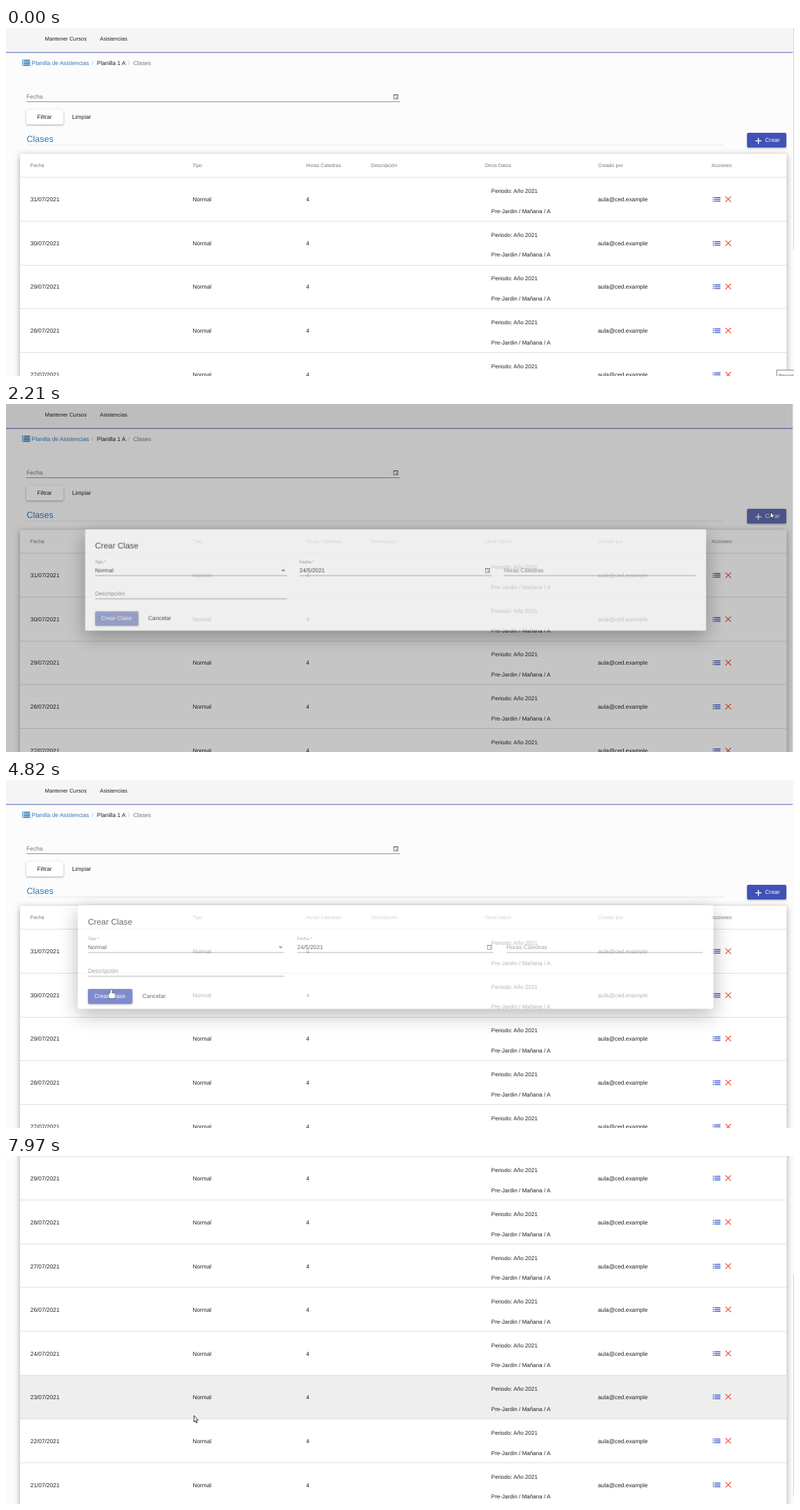
These frames come from a looping animation (1125 by 498 pixels, 8 s). An HTML page with a canvas:

```html
<!DOCTYPE html>
<html lang="es">
<head>
<meta charset="utf-8">
<title>Clases</title>
<style>
html, body { margin: 0; width: 100%; height: 100%; overflow: hidden; background: #fcfcfc; }
canvas { display: block; }
</style>
</head>
<body>
<canvas id="stage" width="1125" height="498"></canvas>
<script>
const W = 1125, H = 498, LOOP = 8000;
const ROW_TOP = 213.3, ROW_H = 62.6, ROWS = 11, SCROLL_END = 338.5;
const INK = 'rgba(0,0,0,.87)', SOFT = 'rgba(0,0,0,.54)', LINE = 'rgba(0,0,0,.42)';
const INDIGO = '#3f51b5', LINK = '#337ab7';
const EMAIL = 'aula@ced.example';

const stage = document.getElementById('stage');
const page = stage.getContext('2d');
const layer = document.createElement('canvas');
layer.width = W;
layer.height = H;
const sheet = layer.getContext('2d');
page.textRendering = sheet.textRendering = 'geometricPrecision';
let c = page;

const clamp = v => Math.max(0, Math.min(1, v));
const span = (t, a, b) => clamp((t - a) / (b - a));
const smooth = u => u * u * (3 - 2 * u);
const easeOut = (u, p) => 1 - Math.pow(1 - u, p);

// Pointer moves: start, end, x, y
const MOVES = [
  [85, 120, 1114, 487],
  [500, 1260, 1062, 178],
  [1300, 1600, 1091, 154],
  [3000, 3190, 588, 250],
  [3430, 3670, 180, 313],
  [3890, 3930, 166, 314],
  [4000, 4250, 150, 300],
  [5580, 5750, 278, 336],
  [7870, 7970, 268, 371]
];

function pointerAt(t) {
  const p = { x: 1114, y: 520 };
  for (const [from, to, x, y] of MOVES) {
    const u = smooth(span(t, from, to));
    p.x += (x - p.x) * u;
    p.y += (y - p.y) * u;
  }
  return p;
}

function text(s, x, y, size = 8.3, color = INK) {
  c.font = size + 'px "Liberation Sans", Arial, sans-serif';
  c.fillStyle = color;
  c.fillText(s, x, Math.round(y));
}

function rect(x, y, w, h, color) {
  c.fillStyle = color;
  c.fillRect(x, y, w, h);
}

function box(x, y, w, h, color, blur, dy, alpha) {
  c.save();
  c.shadowColor = `rgba(0,0,0,${alpha})`;
  c.shadowBlur = blur;
  c.shadowOffsetY = dy;
  c.fillStyle = color;
  c.beginPath();
  c.roundRect(x, y, w, h, 2);
  c.fill();
  c.restore();
}

function button(x, y, w, h, color) {
  box(x, y, w, h, color, 3, 1, 0.34);
}

function line(x0, y0, x1, y1, color, width) {
  c.strokeStyle = color;
  c.lineWidth = width;
  c.beginPath();
  c.moveTo(x0, y0);
  c.lineTo(x1, y1);
  c.stroke();
}

function cross(x, y, r, color, width) {
  line(x - r, y - r, x + r, y + r, color, width);
  line(x + r, y - r, x - r, y + r, color, width);
}

function polygon(points, fill) {
  c.beginPath();
  points.forEach(([x, y]) => c.lineTo(x, y));
  c.closePath();
  c.fillStyle = fill;
  c.fill();
}

function outline() {
  c.strokeStyle = '#222';
  c.lineWidth = 0.9;
  c.stroke();
}

function calendar(x, y) {
  const color = '#666';
  c.strokeStyle = color;
  c.lineWidth = 0.8;
  c.strokeRect(x + 0.5, y + 1.5, 6, 6);
  rect(x, y + 1, 7, 1.4, color);
  rect(x + 3.6, y + 4.5, 1.8, 1.8, color);
}

function bullets(x, y, w, rows, gap, thick, color) {
  for (let i = 0; i < rows; i++) {
    rect(x, y + i * gap, 1.5, thick, color);
    rect(x + 2.4, y + i * gap, w - 2.4, thick, color);
  }
}

function drawHead(t) {
  rect(0, 0, 1123.5, 34.5, '#f5f5f5');
  rect(0, 34.5, 1123.5, 1, '#5361be');
  text('Mantener Cursos', 55.6, 18, 7.75);
  text('Asistencias', 134, 18, 7.75);

  bullets(23, 45.5, 11.5, 4, 2.4, 1.5, '#1f6fb5');
  text('Planilla de Asistencias', 36.6, 53, 8.3, LINK);
  text('/', 122.3, 53, 8.3, '#bbb');
  text('Planilla 1 A', 129.8, 53);
  text('/', 174, 53, 8.3, '#bbb');
  text('Clases', 181.7, 53, 8.3, '#777');

  text('Fecha', 29.3, 101, 8.3, SOFT);
  calendar(553, 94);
  rect(29, 105, 533.5, 1, LINE);
  button(29, 117, 53, 21, '#fff');
  text('Filtrar', 44.4, 130);
  text('Limpiar', 94.4, 130);

  text('Clases', 29.5, 163, 12.5, LINK);
  rect(29, 167, 995, 1, '#e8e8e8');
  drawCreate(t);
}

function drawCreate(t) {
  const focused = (t >= 1940 && t < 2690) || t >= 4880;
  button(1058, 150, 56, 21, focused ? '#3847a0' : INDIGO);
  const grow = span(t, 1970, 2290), fade = 1 - span(t, 2350, 2690);
  if (grow > 0 && fade > 0) {
    c.save();
    c.beginPath();
    c.roundRect(1058, 150, 56, 21, 2);
    c.clip();
    c.fillStyle = `rgba(255,255,255,${0.2 * fade})`;
    c.beginPath();
    c.arc(1091, 159, 36 * easeOut(grow, 2), 0, 7);
    c.fill();
    c.restore();
  }
  line(1070, 161.5, 1078.5, 161.5, '#fff', 1.4);
  line(1074.2, 157.2, 1074.2, 165.8, '#fff', 1.4);
  text('Crear', 1083.8, 163, 8.4, '#fff');
}

function drawRow(i, hovered) {
  const top = Math.round(ROW_TOP + ROW_H * i);
  const mid = ROW_TOP + ROW_H * i + 31.8, y = Math.round(mid);
  const day = 31 - i - (i > 5 ? 1 : 0); // Sunday 25 has no class
  if (hovered) rect(20, top, 1094.5, 63, '#efeeee');
  rect(20, top, 1094.5, 1, '#e0e0e0');
  text(day + '/07/2021', 34.8, mid + 3);
  text('Normal', 266.4, mid + 3);
  text('4', 428.4, mid + 3);
  text('Periodo: Año 2021', 692.8, mid - 9, 8.05);
  text('Pre-Jardin / Mañana / A', 692.8, mid + 19.6, 8.05);
  text(EMAIL, 845, mid + 3);
  bullets(1009, y - 3, 11, 3, 2.6, 1.2, '#3047bd');
  cross(1031.1, y, 3.9, '#ee4b35', 1.2);
}

function drawTable(hover) {
  box(20, 180, 1094.5, 760, '#fff', 9, 2, 0.36);
  const heads = { Fecha: 34.8, Tipo: 266.5, 'Horas Catedras': 428.4, 'Descripción': 521,
    'Otros Datos': 683.3, 'Creado por': 845.2, Acciones: 1007.2 };
  for (const name in heads) text(name, heads[name], 199, 7.12, SOFT);
  for (let i = 0; i < ROWS; i++) drawRow(i, i === hover);
}

function drawScrollbar(scroll, locked) {
  rect(1123.5, 0, 1.5, H, '#fafafa');
  if (!locked) rect(1124, scroll / 2, 1, 317, '#cfcfcf');
}

function field(x, y, label, value) {
  if (value) {
    text(label, x, y - 10, 6.2, SOFT);
    text(value, x, y + 3);
  } else {
    text(label, x, y + 3, 8.3, SOFT);
  }
  rect(x, y + 7.4, 280.5, 1, LINE);
}

function drawDialog(t) {
  c = sheet;
  c.clearRect(0, 0, W, H);
  box(102.5, 169, 907.5, 148.5, '#fff', 28, 9, 0.42);
  text('Crear Clase', 117, 197, 11.86);

  field(117, 229, 'Tipo *', 'Normal');
  field(415.8, 229, 'Fecha *', '24/5/2021');
  field(714.4, 229, 'Horas Cátedras');
  field(117, 263, 'Descripción');
  calendar(687, 225);

  const focus = t < 4600 ? span(t, 2740, 2840) : 0;
  if (focus) text('Tipo *', 117, 219, 6.2, INDIGO);
  polygon([[389, 228], [395, 228], [392, 231.2]], focus ? INDIGO : '#777');
  rect(257.25 - 140.25 * focus, 236, 280.5 * focus, 1.5, INDIGO);

  c.globalAlpha = 0.45 + 0.55 * span(t, 2180, 2450);
  button(117, 289, 63.5, 21.5, INDIGO);
  c.globalAlpha = 1;
  text('Crear Clase', 126, 302, 8.4, '#fff');
  text('Cancelar', 194.8, 302);
  c = page;
}

function placeDialog(t) {
  const closing = t >= 4750;
  const alpha = closing ? 1 - span(t, 4750, 4960) : span(t, 2120, 2245);
  const scale = closing ? 1 : 1 - 0.3 * Math.pow(1 - span(t, 2120, 2270), 2.75);
  const drop = closing ? 10 : 8.5 * (1 - smooth(span(t, 2260, 2400)));
  drawDialog(t);
  c.save();
  c.globalAlpha = alpha;
  c.translate(556.25, 243.25 + drop);
  c.scale(scale, scale);
  c.drawImage(layer, -556.25, -243.25);
  c.restore();
}

function drawHand() {
  c.fillStyle = '#fff';
  c.beginPath();
  c.roundRect(-1, 0, 2.4, 8, 1.2);
  c.roundRect(-3.5, 5, 9.3, 7.6, 2.4);
  outline();
  c.fill();
}

function drawArrow() {
  polygon([[0.3, 0.4], [0.3, 9.6], [2.3, 7.8], [3.7, 11], [5, 10.4], [3.7, 7.3], [6.4, 7.1]], '#fff');
  outline();
}

function drawPointer(p, hand) {
  c.save();
  c.translate(Math.round(p.x), Math.round(p.y));
  c.lineJoin = 'round';
  if (hand) drawHand();
  else drawArrow();
  c.restore();
}

function hoveredRow(t, p, scroll, modal) {
  if (t >= 6000 && t < 6560) return 1; // hover lags behind the scroll
  if (modal || p.x >= 1114 || p.y + scroll < ROW_TOP) return -1;
  return Math.floor((p.y + scroll - ROW_TOP) / ROW_H);
}

function draw(t) {
  const p = pointerAt(t);
  const scroll = SCROLL_END * smooth(span(t, 5985, 6240));
  const modal = t >= 2120 && t < 4960;

  rect(0, 0, W, H, '#fcfcfc');
  c.save();
  c.translate(0, -Math.round(scroll * 2) / 2);
  drawTable(hoveredRow(t, p, scroll, modal));
  drawHead(t);
  c.restore();

  const dim = 0.288 * easeOut(span(t, 2120, 2520), 6) * (1 - span(t, 4735, 4810));
  if (dim > 0) rect(0, 0, 1123.5, H, `rgba(0,0,0,${dim})`);
  drawScrollbar(scroll, modal);
  if (modal) placeDialog(t);

  if (t < 70) {
    rect(1100, 489, 25, 9, '#8a8a8a');
    rect(1101, 490, 24, 8, '#fff');
    text('Recort', 1103, 500, 7.2, '#555');
  }
  drawPointer(p, t >= 4120 && t < 4960);
}

const start = performance.now();
function tick() {
  draw((performance.now() - start) % LOOP);
  requestAnimationFrame(tick);
}
tick();
</script>
</body>
</html>
```
